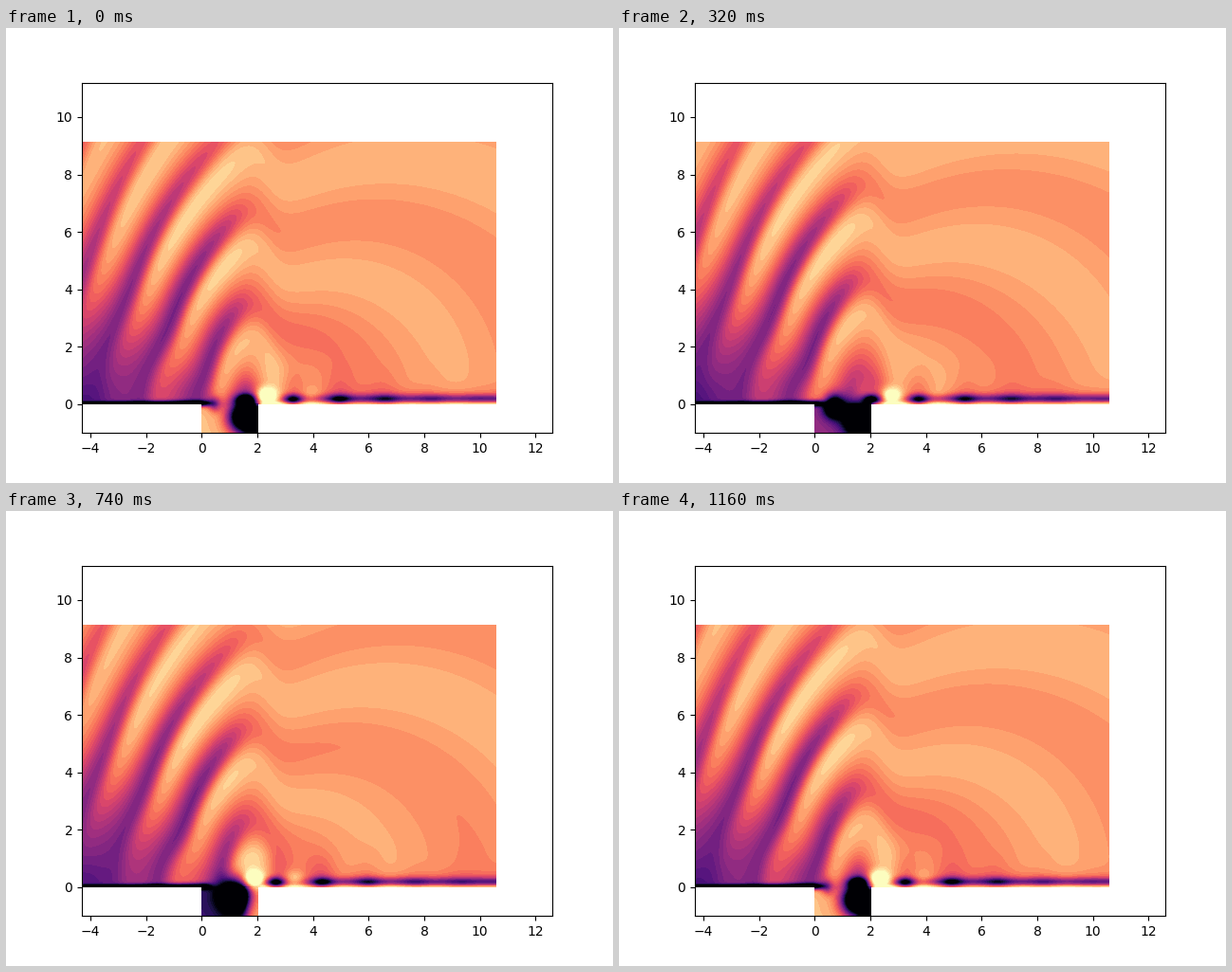
Recreate the animation shown at these times as a matplotlib script. Size 640 by 480 pixels, loop 1180 ms.

```python
import numpy as np
import matplotlib.pyplot as plt
from matplotlib.animation import FuncAnimation

FRAMES, STEP = 59, 20
LEFT, RIGHT, TOP = -4.31, 10.587, 9.14
MACH, WAVE = 0.6, 4.05      # flow speed and acoustic wavelength
SPACING = 1.67              # distance between shed vortices
LEVELS = np.linspace(0, 1, 29)


def sig(z):
    return 0.5 * (1 + np.tanh(z / 2))


def bump(x, y, cx, cy, sx, sy):
    return np.exp(-((x - cx) / sx) ** 2 - ((y - cy) / sy) ** 2)


def acoustic(x, y, t):
    """Sound convected by the stream, radiated from the trailing edge."""
    dx = x - 2
    b2 = 1 - MACH ** 2
    r = (-MACH * dx + np.sqrt(dx ** 2 + b2 * y ** 2)) / b2
    # wavefronts lean forward near the upstream wall
    slope = y / (np.abs(dx) + 0.1)
    r = r - 1.7 * np.exp(-(slope / 0.5) ** 2) * sig((-0.4 - x) / 0.4)
    # wavefronts jump across the line above the trailing edge
    aft = sig((x - 2.4) / 0.3)
    phi = 2 * np.pi * ((r - 7.35 + 2.9 * aft) / WAVE - t)
    wave = np.cos(phi + 0.35 * (1 - aft) * (1 - np.cos(phi)))

    calm = 1 - 0.93 * bump(x, y, -4, 0, 3.2, 3.6)
    fan = 0.24 * sig((1.5 - x) / 0.4) * bump(x, y, -0.5, 3.5, 5, 6)
    amp = calm * (0.042 + fan + 0.03 * bump(x, y, 3, 1.5, 2.5, 2.5))

    mean = 0.785 + 0.003 * y
    mean = mean - 0.23 * sig((1.1 - x) / 0.5) * np.exp(-(y / 8) ** 2)
    mean -= 0.24 * bump(x, y, -4.2, 0, 2.5, 3.6)
    mean -= 0.08 * bump(x, y, -4.3, 0, 0.8, 0.8)
    mean -= 0.025 * bump(x, y, 3.5, 1.5, 3, 3)
    return mean + amp * wave


def cavity_base(x, t):
    fore = 0.47 + 0.4 * np.cos(2 * np.pi * t)
    rear = 0.48 - 0.36 * np.cos(2 * np.pi * (t - 0.61))  * -1
    return fore + (rear - fore) * sig((x - 1.6) / 0.1)


def wall_layers(x, y):
    thick = 0.065 + 0.012 * np.clip(x - LEFT, 0, 5)
    v = -0.95 * sig((0.25 - x) / 0.1) * np.exp(-((y - 0.03) / thick) ** 2)
    wake = sig((x - 4) / 0.5)
    v -= 0.38 * wake * np.exp(-((y - 0.2) / 0.15) ** 2)
    v -= 0.1 * wake * np.exp(-((y - 0.2) / 0.35) ** 2)
    return v + 0.25 * sig((x - 2.1) / 0.05) * np.exp(-(y / 0.07) ** 2)


def low_cores(x, y, t):
    """Dark vortices convected along the wall behind the cavity."""
    v = 0
    for k in range(-2, 5):
        cx = 3.27 + SPACING * (t + k)
        far = max(cx - 3, 0)
        a = 0.9 * np.exp(-far / 2.6) * sig((cx - 1.4) / 0.07)
        v = v - a * bump(x, y, cx, 0.17, 0.33 + 0.03 * far, 0.18)
        v -= 0.14 * a * bump(x, y, cx, 0.5, 0.5, 0.65)
    return v


def high_cores(x, y, t):
    """Bright spots that linger at the trailing edge, then drift away."""
    v = 0
    for age in t + np.arange(-1, 4):
        cx = 1.7 + SPACING * 0.15 * np.log1p(np.exp((age + 0.35) / 0.15))
        a = 0.55 * sig((age + 0.55) / 0.06) / (1 + (max(age, 0) / 0.5) ** 2)
        v = v + a * bump(x, y, cx, 0.27, 0.35, 0.28)
        v += 0.2 * a * bump(x, y, cx, 0.6, 0.6, 0.9)
    return v


def cavity_vortex(x, y, t):
    """Vortex that rolls up at the leading edge and crosses the cavity."""
    v = 0
    for age in t + np.arange(-1, 2):
        cx = 0.95 + 0.62 * np.tanh((age - 0.46) / 0.42)
        cy = 0.05 - 0.6 * sig((age - 0.6) / 0.25)
        a = 1.3 * sig((age - 0.1) / 0.12) * sig((1.37 - age) / 0.07)
        s = 0.22 + 0.28 * sig((age - 0.3) / 0.08)
        v = v - a * bump(x, y, cx, cy, s, 1.1 * s)
        v -= 0.13 * a * bump(x, y, cx, cy, 1.6 * s, 1.4 * s)
    return v


def field(x, y, t):
    inside = sig(-y / 0.07)
    if y.max() > 0:
        inside = inside * sig(x / 0.04) * sig((2 - x) / 0.04)
    v = (1 - inside) * acoustic(x, y, t) + inside * cavity_base(x, t)
    return (v + wall_layers(x, y) + low_cores(x, y, t)
            + high_cores(x, y, t) + cavity_vortex(x, y, t))


stream = np.meshgrid(np.linspace(LEFT, RIGHT, 360),
                     np.r_[np.linspace(0, 0.6, 36), np.linspace(0.65, TOP, 125)])
cavity = np.meshgrid(np.linspace(0, 2, 80), np.linspace(-1, 0, 45))

fig, ax = plt.subplots(figsize=(6.4, 4.8), dpi=100)
drawn = []


def update(i):
    while drawn:
        drawn.pop().remove()
    t = i / FRAMES
    for x, y in (stream, cavity):
        drawn.append(ax.contourf(x, y, field(x, y, t), LEVELS, cmap="magma",
                                 vmin=0, vmax=1, extend="both"))
    ax.set_xlim(LEFT, 12.6)
    ax.set_ylim(-1, 11.2)
    return drawn


anim = FuncAnimation(fig, update, frames=FRAMES, interval=STEP,
                     init_func=lambda: update(0), repeat=True, blit=False)
plt.show()
```
